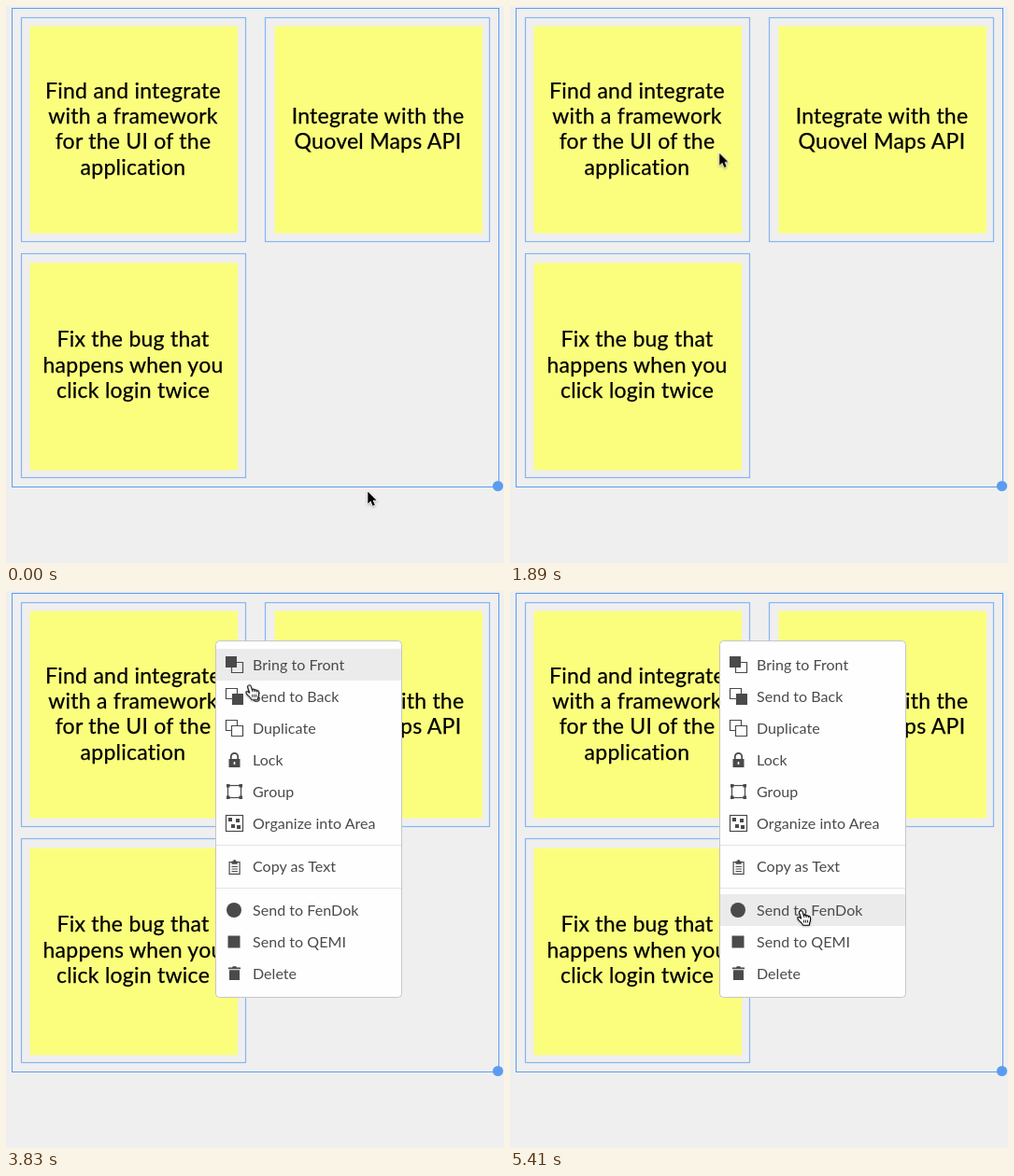
An HTML page that plays this animation: 533x597 px, repeating every 6280 ms.

```html
<!DOCTYPE html>
<html lang="en">
<head>
<meta charset="utf-8">
<title>Sticky note menu</title>
<style>
  html, body { margin: 0; width: 100%; height: 100%; overflow: hidden; background: #efefef; }
  svg { display: block; width: 533px; height: 597px; font-family: Lato, "Open Sans", sans-serif; }

  .area { fill: none; stroke: #5b9cf0; }
  .dot { fill: #5b9cf0; }
  .outline { fill: none; stroke: #86b5f2; stroke-width: 1.2; }
  .paper { fill: #fbfe7d; }
  .note text { font-size: 23px; letter-spacing: .25px; text-anchor: middle; fill: #000; stroke: #000; stroke-width: .25; }

  .panel { fill: #fefefe; stroke: #c6c6c6; }
  .rule { stroke: #e4e4e4; }
  .labels { font-size: 16px; letter-spacing: .05px; fill: #4a4a4a; }
  .solid { fill: #4a4a4a; }
  .line { fill: none; stroke: #4a4a4a; stroke-width: 1.2; }
  .hover { fill: #ebebeb; }

  .menu, .hover, .arrow, .hand { animation: 6280ms linear infinite; }
  .menu { animation-name: menu; animation-timing-function: step-end; }
  .hover { animation-name: hover; animation-timing-function: step-end; }
  .arrow { animation-name: arrow; filter: drop-shadow(0 1px 1px rgba(0, 0, 0, .3)); }
  .hand { animation-name: hand; filter: drop-shadow(0 1px 1px rgba(0, 0, 0, .25)); }

  @keyframes menu {
    0% { visibility: hidden; }
    51.42%, 100% { visibility: visible; }
  }

  /* Row highlight trails the pointer slightly; 999px parks it off stage. */
  @keyframes hover {
    0% { transform: translateY(999px); }
    59.08% { transform: translateY(0); }
    61.46% { transform: translateY(34px); }
    63.38% { transform: translateY(68px); }
    65.29% { transform: translateY(102px); }
    67.36% { transform: translateY(136px); }
    68.79% { transform: translateY(170px); }
    69.59% { transform: translateY(999px); }
    70.06% { transform: translateY(217px); }
    80.41% { transform: translateY(999px); }
    83.28%, 100% { transform: translateY(263px); }
  }

  @keyframes arrow {
    0%, .2% { transform: translate(387px, 520px); animation-timing-function: ease-out; }
    3.5%, 7.9% { transform: translate(366px, 473px); animation-timing-function: cubic-bezier(.4, .1, .7, .7); }
    18% { transform: translate(274px, 281px); }
    21.5% { transform: translate(248px, 219px); animation-timing-function: cubic-bezier(.2, .45, .6, 1); }
    28.2%, 28.4% { transform: translate(223px, 167px); animation-timing-function: ease-in; }
    33.4% { transform: translate(228px, 108px); animation-timing-function: ease-out; }
    38.2%, 39.63% { transform: translate(219px, 53px); visibility: visible; }
    39.64%, 100% { transform: translate(219px, 53px); visibility: hidden; }
  }

  @keyframes hand {
    0%, 39.63% { transform: translate(218px, 54px); visibility: hidden; }
    39.64%, 57.8% { transform: translate(218px, 54px); visibility: visible; animation-timing-function: cubic-bezier(.4, .2, .7, .7); }
    60.99% { transform: translate(256px, 100px); }
    67.04% { transform: translate(289px, 204px); }
    68% { transform: translate(290px, 220px); animation-timing-function: cubic-bezier(.3, .3, .6, 1); }
    70.7%, 76.8% { transform: translate(293px, 294px); animation-timing-function: cubic-bezier(.35, .1, .6, 1); }
    86.14%, 100% { transform: translate(307px, 342px); visibility: visible; }
  }
</style>
</head>
<body>
<svg viewBox="0 0 533 597">
  <rect class="area" x="6.5" y="2.5" width="521" height="513"/>
  <circle class="dot" cx="526.5" cy="514.5" r="5.6"/>

  <g class="note">
    <rect class="outline" x="16.5" y="12.5" width="240" height="240"/>
    <rect class="paper" x="25.5" y="21.5" width="222.5" height="222"/>
    <text x="136" y="99">Find and integrate</text>
    <text x="136" y="126">with a framework</text>
    <text x="136" y="153">for the UI of the</text>
    <text x="136" y="181">application</text>
  </g>
  <g class="note">
    <rect class="outline" x="277.5" y="12.5" width="240" height="240"/>
    <rect class="paper" x="287.5" y="21.5" width="222.5" height="222"/>
    <text x="398" y="126">Integrate with the</text>
    <text x="398" y="153">Quovel Maps API</text>
  </g>
  <g class="note">
    <rect class="outline" x="16.5" y="265.5" width="240" height="240"/>
    <rect class="paper" x="25.5" y="275.5" width="222.5" height="222"/>
    <text x="136" y="365">Fix the bug that</text>
    <text x="136" y="393">happens when you</text>
    <text x="136" y="420">click login twice</text>
  </g>

  <g class="menu">
    <rect class="panel" x="224.5" y="53.5" width="199" height="382" rx="4"/>
    <rect class="hover" x="225" y="62" width="198" height="34"/>
    <path class="rule" d="M225 272.5H423M225 318.5H423"/>

    <!-- front, back, duplicate -->
    <rect class="solid" x="235" y="70" width="12" height="12"/>
    <path class="line" d="M247 76.5H253.5V87.5H241.5V82"/>
    <path class="line" d="M242 115.5H235.5V104.5H247.5V110"/>
    <rect class="solid" x="242" y="110" width="12" height="12"/>
    <path class="line" d="M241.5 149.5H235.5V138.5H247.5V144.5M241.5 144.5H253.5V155.5H241.5Z"/>

    <!-- lock -->
    <path class="line" style="stroke-width:1.8" d="M240.8 181V177.5a3.7 3.7 0 0 1 7.4 0V181"/>
    <path class="solid" fill-rule="evenodd" d="M238.5 180h12v9h-12zM243.7 183v3h1.6v-3z"/>

    <!-- group -->
    <rect class="line" x="237.5" y="208.5" width="14" height="13"/>
    <path class="solid" d="M236 207h3.5v3.5H236zM249.5 207h3.5v3.5h-3.5zM236 219.5h3.5v3.5H236zM249.5 219.5h3.5v3.5h-3.5z"/>

    <!-- organize -->
    <rect class="line" x="235.5" y="240.5" width="18" height="17"/>
    <path class="solid" d="M238 243h4v4h-4zM246 244h4v4h-4zM241 250h4v4h-4zM247 251h4v4h-4z"/>

    <!-- clipboard -->
    <rect class="line" x="239.1" y="290.6" width="11" height="12.8"/>
    <path class="solid" d="M241.5 289.5h1.7a1.4 1.4 0 0 1 2.8 0h1.7v3.2h-6.2z"/>
    <path class="line" style="stroke-width:1" d="M241.5 295.5h6.4M241.5 298h6.4M241.5 300.5h6.4"/>

    <circle class="solid" cx="244" cy="342" r="8"/>
    <rect class="solid" x="237.5" y="369.5" width="13" height="13"/>

    <!-- trash -->
    <path class="solid" d="M238 403.5h4l.8-1.2h3.4l.8 1.2h4v1.8h-13zM239 406.3h11v10.7h-11z"/>

    <g class="labels">
      <text x="264" y="84.5">Bring to Front</text>
      <text x="264" y="118.5">Send to Back</text>
      <text x="264" y="152.5">Duplicate</text>
      <text x="264" y="186.5">Lock</text>
      <text x="264" y="220.5">Group</text>
      <text x="264" y="254.5">Organize into Area</text>
      <text x="264" y="300.5">Copy as Text</text>
      <text x="264" y="347.5">Send to FenDok</text>
      <text x="264" y="381.5">Send to QEMI</text>
      <text x="264" y="415.5">Delete</text>
    </g>
  </g>

  <g class="arrow">
    <path d="M.3.4V13.4L3.3 10.6 5.5 15.7 7.8 14.7 5.6 9.7H9.6Z" stroke="#fff" stroke-width="1.6" paint-order="stroke"/>
  </g>
  <g class="hand">
    <path fill="#fff" stroke="#000" stroke-width="1.1" stroke-linejoin="round"
      d="M3.2 1.2C4.4.2 5.8.8 6.2 2.2L7.3 5.6C8 4.9 9.3 5 9.8 6 10.6 5.3 11.9 5.6 12.2 6.6 13.2 6.1 14.3 6.8 14.5 8 14.8 10 14.6 11.8 13.8 13.4L13.4 16.2H6.6C6 14.2 3.6 12.6 2 10.8.8 9.4.4 8 1.4 7.6 2.6 7.2 3.6 8.2 4.6 9L2.6 3C2.4 2.3 2.6 1.6 3.2 1.2Z"/>
    <path fill="none" stroke="#000" stroke-width=".9" d="M7.3 5.6L8 8M9.8 6L10.3 8M12.2 6.6L12.5 8.4M7.6 10.6V13.6M9.6 10.6V13.6M11.6 10.6V13.6"/>
  </g>
</svg>
</body>
</html>
```
